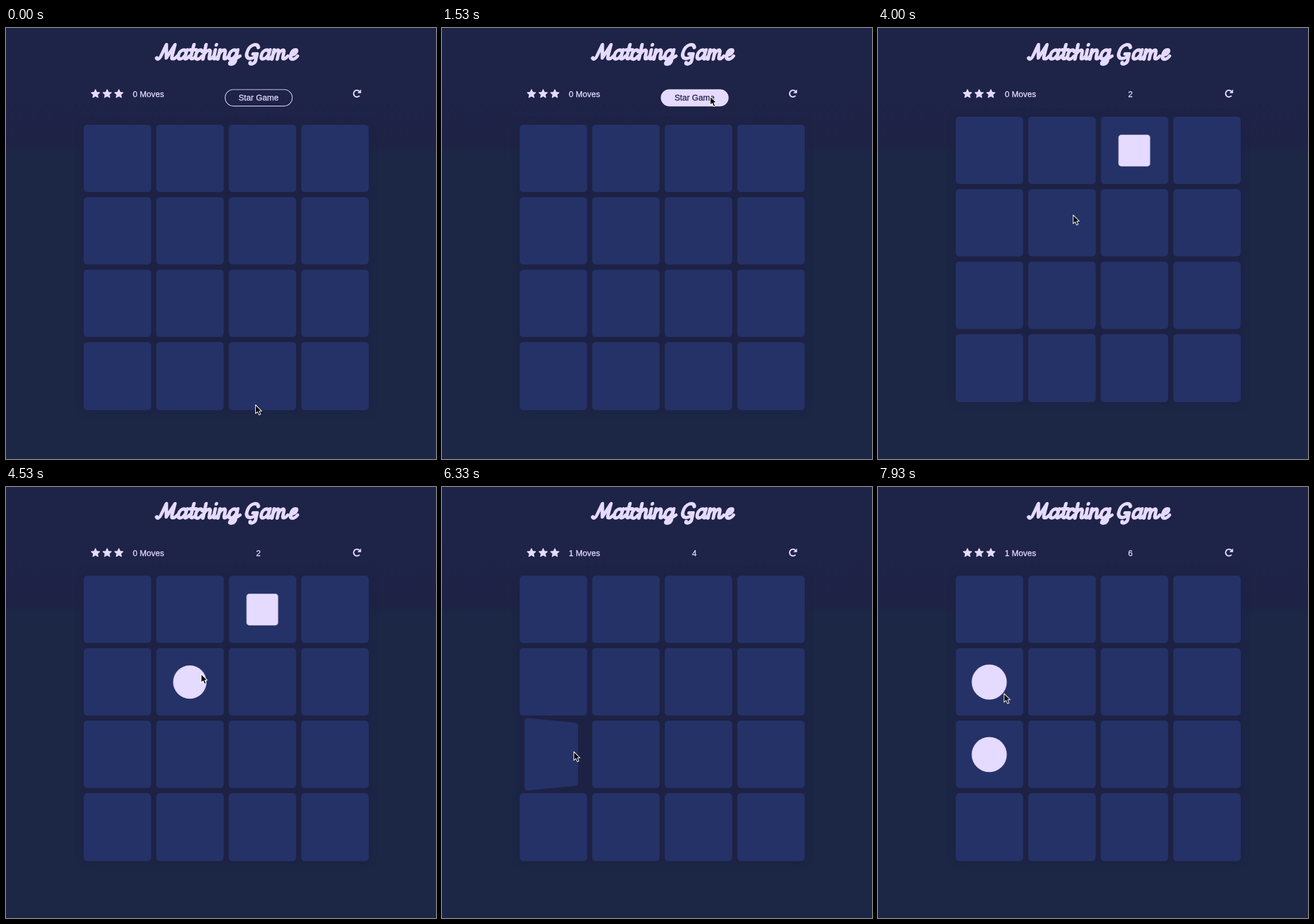
Recreate the animation shown at these times as an HTML page. Size 747 px wide and 749 px high, loop 8 s.

```html
<!DOCTYPE html>
<html lang="en">
<head>
<meta charset="utf-8">
<title>Matching Game</title>
<style>
  html, body { margin: 0; width: 100%; height: 100%; overflow: hidden; background: #1c2645; }
  #stage { position: relative; width: 747px; height: 749px; overflow: hidden;
    background: linear-gradient(#1e2448, #1e2346 206px, #1c2645 218px, #1c2645); }
  svg { position: absolute; left: 0; top: 0; }
  text { font: 14.4px "Liberation Sans", Arial, sans-serif; fill: #e5daff; stroke: #e5daff; stroke-width: .3px; }
  #board { position: absolute; left: 134.5px; width: 495.5px; height: 495.5px;
    background: #1d2245; border-radius: 6px; box-shadow: 0 0 14px #1d2245; }
  .card { position: absolute; width: 117.3px; height: 117.3px; border-radius: 6px; background: #253267; }
  .icon { position: absolute; left: 50%; top: 50%; background: #e5daff;
    transform: translate(-50%, -50%); visibility: hidden; }
</style>
</head>
<body>
<div id="stage">
  <svg width="747" height="749" viewBox="0 0 747 749">
    <g id="title" role="heading" aria-label="Matching Game" fill="none" stroke="#e5daff"
       stroke-width="6" stroke-linecap="round" stroke-linejoin="round"></g>
    <g id="stars" fill="#e5daff" stroke="#e5daff" stroke-width="1.6" stroke-linejoin="round"></g>
    <text id="moves" x="220.3" y="119.5"></text>
    <g id="start">
      <rect id="pill" x="380.7" y="107" width="116.6" height="28.6" rx="14.3" fill="#e5daff" stroke="#e5daff" stroke-width="1.2"/>
      <text id="label" x="438.7" y="126.3" text-anchor="middle">Star Game</text>
    </g>
    <text id="clock" x="438.5" y="119.5" text-anchor="middle"></text>
    <path d="M614.2 117.6A5.8 5.8 0 1 1 614 110.1" fill="none" stroke="#e5daff" stroke-width="2.3"/>
    <path d="M616.8 106.8v6.4h-6.6z" fill="#e5daff"/>
  </svg>
  <div id="board"></div>
  <svg width="747" height="749" viewBox="0 0 747 749">
    <path id="cursor" d="M0 0V15L3.5 11.8 6 17.4 8.7 16.2 6.3 10.8H10.8Z" fill="#000"
          stroke="#fff" stroke-width="1.1" stroke-linejoin="round"/>
  </svg>
</div>
<script>
const LOOP = 8000, START = 1560, MISS = 5230, FLIP = 500, SWING = 500;
const $ = id => document.getElementById(id);
const clamp = v => Math.max(0, Math.min(1, v));
const mix = (a, b, p) => a + (b - a) * p;

// CSS "ease": cubic-bezier(.25, .1, .25, 1)
function ease(x) {
  if (x <= 0) return 0;
  if (x >= 1) return 1;
  const bez = (a, b, s) => 3 * a * s * (1 - s) ** 2 + 3 * b * s * s * (1 - s) + s ** 3;
  let lo = 0, hi = 1;
  for (let i = 0; i < 24; i++) {
    const mid = (lo + hi) / 2;
    if (bez(.25, .25, mid) < x) lo = mid; else hi = mid;
  }
  return bez(.1, 1, lo);
}

// Script lettering, drawn upright on a baseline and then slanted
const BOWL = 'M14-14C10-20 2-16 2-7C2 1 10 1 14-9L15-17';
const GLYPHS = {
  M: 'M1-3C4 1 7-2 8-7L13-26 18-3 28-26 27-6C27 0 32 0 36-6',
  a: BOWL + 'L14-5C13 0 18 0 21-6',
  t: 'M6-26L5-6C5 0 10 0 13-6M1-17H12',
  c: 'M12-14C9-20 2-16 2-7C2 1 9 1 13-6',
  h: 'M3-1V-26M3-8C5-16 13-20 13-12V-6C13 0 17 0 20-6',
  i: 'M3-17V-6C3 0 7 0 10-6M3-26V-25.5',
  n: 'M2-1V-17M2-8C4-17 12-20 12-12V-6C12 0 16 0 19-6',
  g: BOWL + 'L15 3C14 9 5 9 6 5C7 1 15 0 21-6',
  G: 'M20-21C17-30 3-27 2-12C1 1 17 1 20-10H13M20-10V2C20 8 11 9 11 5',
  m: 'M2-1V-17M2-8C4-17 11-20 11-12V-1M11-8C13-17 20-20 20-12V-6C20 0 24 0 28-6',
  e: 'M3-8C11-8 13-17 8-17C3-17 2-12 2-7C2 1 10 1 14-6'
};
const letterX = [260, 296, 315, 326, 339, 357, 366, 384, 414, 440, 460, 491];
$('title').innerHTML = [...'MatchingGame'].map((c, i) =>
  `<path d="${GLYPHS[c]}" transform="translate(${letterX[i]} 55) skewX(-12)"/>`).join('');

const star = Array.from({ length: 10 }, (_, i) => {
  const r = i % 2 ? 3.5 : 7.4, a = (i / 5 - .5) * Math.PI;
  return [(r * Math.cos(a)).toFixed(2), (r * Math.sin(a)).toFixed(2)];
}).join(' ');
$('stars').innerHTML = [155.4, 175.7, 196].map(x =>
  `<polygon points="${star}" transform="translate(${x} 114.6)"/>`).join('');

const cards = Array.from({ length: 16 }, (_, i) => {
  const el = document.createElement('div');
  el.className = 'card';
  el.style.left = (i % 4) * 126.1 + 'px';
  el.style.top = (i >> 2) * 126.1 + 'px';
  $('board').append(el);
  return el;
});

// Cards that get turned over
const turns = [
  { card: 2, at: 2820, size: 55, radius: '5px', miss: true },
  { card: 5, at: 4050, size: 58, radius: '50%', miss: true },
  { card: 8, at: 6250, size: 61, radius: '50%' },
  { card: 4, at: 7080, size: 61, radius: '50%' }
];
for (const turn of turns) {
  turn.icon = document.createElement('div');
  turn.icon.className = 'icon';
  turn.icon.style.width = turn.icon.style.height = turn.size + 'px';
  turn.icon.style.borderRadius = turn.radius;
  cards[turn.card].append(turn.icon);
}

const swingAngles = [0, 15, -10, 5, -5, 0];
function pose(turn, t) {
  if (!turn.miss || t < MISS) return [180 * ease((t - turn.at) / FLIP), 0];
  const k = (t - MISS) / SWING * 5;
  if (k >= 5) return [0, 0];
  const n = Math.floor(k), p = ease(k - n);
  return [n ? 0 : 180 * (1 - p), mix(swingAngles[n], swingAngles[n + 1], p)];
}

// Pointer path: time, x, y
const path = [
  [0, 434.5, 655], [70, 434.5, 655], [220, 415, 683], [450, 326, 420], [620, 322, 180],
  [780, 395, 48], [870, 455, 55], [930, 464, 88], [1100, 469, 112], [1300, 467, 119],
  [1870, 467, 119], [2300, 455, 180], [2620, 447, 219.5], [3470, 447, 219.5],
  [3950, 340, 325], [5000, 340, 325], [5330, 232, 441.5], [5600, 230, 460],
  [6800, 230, 460], [7060, 217, 352], [7670, 217, 352], [7900, 220, 359], [LOOP, 220, 359]
];
function slope(i, d) {
  const a = path[i - 1], b = path[i], c = path[i + 1];
  const still = (p, q) => p[1] === q[1] && p[2] === q[2];
  if (!a || !c || still(a, b) || still(b, c)) return 0;
  return (c[d] - a[d]) / (c[0] - a[0]);
}
function pointer(t) {
  let i = 0;
  while (i < path.length - 2 && path[i + 1][0] <= t) i++;
  const a = path[i], b = path[i + 1], span = b[0] - a[0], s = (t - a[0]) / span;
  return [1, 2].map(d =>
    mix(a[d], b[d], s * s * (3 - 2 * s)) +
    span * s * (1 - s) * (slope(i, d) * (1 - s) - slope(i + 1, d) * s));
}

function draw(t) {
  const playing = t >= START;
  $('board').style.top = (playing ? 154 : 168) + 'px';
  $('start').style.display = playing ? 'none' : '';
  $('clock').textContent = playing ? Math.floor((t - START) / 1000) : '';
  $('moves').textContent = (t < MISS ? 0 : 1) + ' Moves';

  const hover = clamp((t - 1060) / 200);
  $('pill').style.fillOpacity = hover;
  $('label').style.fill = $('label').style.stroke =
    `rgb(${mix(229, 31, hover)},${mix(218, 35, hover)},${mix(255, 71, hover)})`;

  for (const turn of turns) {
    const [y, z] = pose(turn, t);
    cards[turn.card].style.transform = y || z ? `perspective(450px) rotateY(${y}deg) rotateZ(${z}deg)` : '';
    turn.icon.style.visibility = y > 90 ? 'visible' : 'hidden';
  }
  const [x, y] = pointer(t);
  $('cursor').setAttribute('transform', `translate(${x - 1} ${y})`);
}

const origin = performance.now();
function tick() {
  draw((performance.now() - origin) % LOOP);
  requestAnimationFrame(tick);
}
draw(0);
requestAnimationFrame(tick);
</script>
</body>
</html>
```
